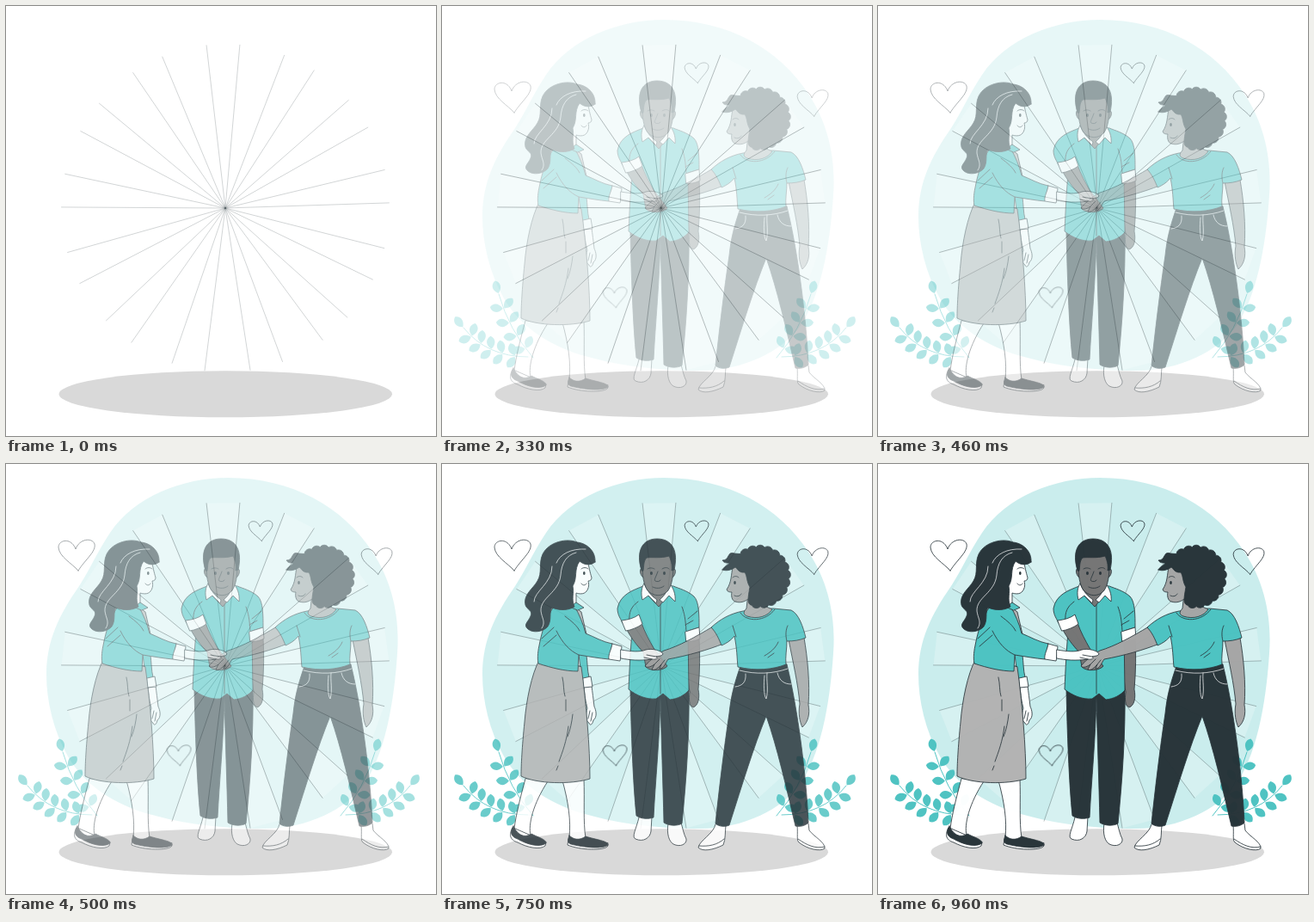
Write an HTML page that moves like this. It is 500x500 px and loops after 1000 ms.

```html
<!DOCTYPE html>
<html lang="en">
<head>
<meta charset="utf-8">
<title>Together</title>
<style>
html, body { margin: 0; width: 100%; height: 100%; overflow: hidden; background: #fff; }
svg { display: block; width: 100vw; height: 100vh; }
.fade { opacity: 0; }
path { stroke-linejoin: round; stroke-linecap: round; }
.fig path { stroke: #263238; stroke-width: .85; fill: none; }
.fig .dark { fill: #263238; }
.fig .teal { fill: #4bc2c1; }
.fig .white { fill: #fff; }
.fig .skirt { fill: #b2b2b2; }
.fig .deep { fill: #747474; }
.fig .tan { fill: #a5a5a5; }
.fig .chalk { stroke: #fff; stroke-width: .7; }
ellipse { fill: #263238; }
#floor { fill: #d9d9d9; }
.leaf { fill: #4bc2c1; }
.stem { fill: none; stroke: #4bc2c1; }
</style>
</head>
<body>
<svg viewBox="0 0 500 500" xmlns="http://www.w3.org/2000/svg">
  <path class="fade" data-max=".3" fill="#4bc2c1" d="M258 16C333 16 392 50 426 102C450 138 458 180 455 220C452 265 444 330 418 370C396 402 350 424 300 424C250 424 205 418 170 408C130 398 92 375 72 340C55 310 47 275 47 245C47 205 62 175 85 142C98 122 105 104 121 80C149 38 205 16 258 16Z"/>
  <g id="rays"></g>
  <ellipse id="floor" cx="255.300" cy="451.300" rx="193.700" ry="27"/>
  <g id="hearts" class="fade fig"></g>
  <g id="plants" class="fade"></g>

  <g class="fade fig" id="man">
    <path class="deep" d="M284 204C286 225 285 250 288 265C287 274 287 281 292 283C298 281 300 272 298 262C300 240 300 220 299 202Z"/>
    <path class="white" d="M229 411C226 424 220 434 225 436C234 440 242 435 243 427L244 410Z"/>
    <path class="white" d="M263 418C261 430 264 439 269 442C277 446 285 442 284 436C281 430 280 424 278 417Z"/>
    <path class="dark" d="M219 262C220 310 222 370 226 409C232 413 240 413 246 411C248 370 253 320 254 270C255 320 257 370 258 417C264 421 274 421 279 418C284 370 288 310 287 262Z"/>
    <path class="teal" d="M234 142C221 147 207 152 204 168C204 176 208 180 210 185L222 186C219 213 218 240 217 262C226 269 237 274 249 273L257 267L265 274C274 273 282 269 287 263L286 194L299 190C299 176 299 160 293 154C285 147 276 145 269 142Z"/>
    <path d="M254 163V267M218 183C217 172 220 166 228 160M284 194C283 180 282 174 279 166M286 180L297 171M283 187L292 182"/>
    <path class="deep" d="M238 142L236 149L252 166L266 149L264 142Z"/>
    <path class="white" d="M235 139C232 143 231 150 233 158L240 153L249 162L250 158C243 153 238 147 235 139ZM264 138C269 144 272 151 271 160L264 153L257 161L253 158C260 152 263 146 264 138Z"/>
    <path class="deep" d="M234 122C229 119 229 129 235 133ZM267 122C273 119 273 129 267 133Z"/>
    <path class="deep" d="M234 106C232 123 233 138 239 147C247 155 257 154 263 147C269 138 270 122 268 105Z"/>
    <path class="dark" d="M232 124C225 101 233 87 250 87C268 87 275 101 270 123L267 124C268 117 266 111 264 107C254 110 244 108 238 109C234 113 235 119 234 124Z"/>
    <path d="M251 125C249 131 246 135 248 136C250 137 253 137 254 135M245 143C249 145 254 145 258 142M239 122C242 120 245 121 247 122M256 122C259 120 262 120 264 122"/>
    <ellipse cx="243.500" cy="127" rx="1.500" ry="2"/>
    <ellipse cx="258.500" cy="127" rx="1.500" ry="2"/>
    <path class="deep" d="M214 191C220 203 227 211 234 219L237 236C243 242 258 240 262 235L246 214C241 205 236 196 232 185Z"/>
    <path class="white" d="M209 182C217 181 224 179 229 175L233 186C228 190 220 193 214 194Z"/>
    <path class="white" d="M283 195L299 190L300 203C295 206 288 207 284 206Z"/>
  </g>

  <g class="fade fig" id="right">
    <path class="tan" d="M403 204C408 230 414 255 416 279C414 290 416 300 419 306C426 300 428 290 426 280C428 255 425 225 421 202Z"/>
    <path class="white" d="M318 419C316 430 299 438 298 446C303 451 315 449 327 443C330 436 329 428 330 420Z"/>
    <path class="white" d="M413 419C414 432 412 437 415 440C425 448 440 451 445 447C446 440 432 433 427 426L426 418Z"/>
    <path d="M299 444C310 445 320 443 328 436M414 436C424 443 434 448 445 445"/>
    <path class="dark" d="M347 235C340 255 336 270 334 290C328 330 322 380 318 418C322 422 330 422 334 420C350 370 362 330 377 293C390 330 400 375 411 421C416 422 422 421 426 417C424 370 415 290 401 233Z"/>
    <path class="chalk" d="M346 240C365 245 385 244 402 238M378 243C377 252 380 262 377 273C374 269 374 256 375 246M353 244C354 254 349 258 341 259M390 243C392 252 398 256 406 256"/>
    <path class="tan" d="M315 189C295 201 275 212 258 217C248 222 240 230 236 235C239 238 244 235 247 233L244 239C248 241 252 236 255 233L253 238C258 238 260 231 263 227C285 223 310 216 327 209Z"/>
    <path d="M247 233L253 227M255 233L259 228"/>
    <path class="teal" d="M350 171C335 174 324 180 313 190C318 195 322 203 325 211C332 208 337 204 340 200C343 214 343 226 344 236C365 241 385 239 400 233C399 225 401 215 401 206C409 206 416 205 423 202C420 190 415 174 406 170L385 168Z"/>
    <path d="M338 188L342 201M401 206C399 198 400 192 402 188M375 223C382 219 388 214 391 207M379 225L386 220"/>
    <path class="tan" d="M356 150L354 168C350 172 350 175 355 177C367 181 379 177 384 169L375 165Z"/>
    <path d="M347 173C354 184 376 184 387 169"/>
    <path class="tan" d="M338 120C336 129 337 137 331 146C332 149 335 149 337 149C336 153 337 159 341 160C347 162 353 160 357 156L368 140L358 118Z"/>
    <path d="M340 153C344 155 347 153 348 151M338 132C340 130 343 130 345 132"/>
    <ellipse cx="340.500" cy="138" rx="1.300" ry="2"/>
    <path id="curls" class="dark"/>
  </g>

  <g class="fade fig" id="left">
    <path class="white" d="M97 366C91 388 86 408 84 424C88 435 97 437 103 432C100 419 106 395 123 369Z"/>
    <path class="white" d="M140 368C147 393 150 415 148 434C153 440 162 440 167 435C164 415 166 392 165 366Z"/>
    <path class="white" d="M82 423C78 430 78 437 88 440C99 446 114 449 120 444L121 440Z"/>
    <path class="dark" d="M83 421C79 427 79 433 88 436C100 443 114 446 121 441C121 436 111 434 104 430C95 436 87 430 83 421Z"/>
    <path class="white" d="M147 436L146 443C160 449 189 450 193 444L193 441Z"/>
    <path class="dark" d="M148 432C146 437 146 441 150 442C165 446 188 448 193 443C193 438 179 437 167 433C160 438 153 437 148 432Z"/>
    <path class="white" d="M165 258C166 270 167 276 169 284C167 290 167 300 171 301C172 305 175 303 176 298C181 294 179 286 177 282C176 273 175 266 174 258Z"/>
    <path d="M172 287L170 296M175 289L173 299"/>
    <path class="teal" d="M158 212L168 222C169 230 169 240 171 248L163 250Z"/>
    <path class="white" d="M164 249L173 247L175 259L165 260Z"/>
    <path class="skirt" d="M113 228C104 245 98 275 96 300C93 330 92 350 92 363C110 372 150 373 172 366C172 330 168 280 162 236Z"/>
    <path d="M140 248C142 256 141 264 143 270M144 274L144 287M152 291C151 300 149 310 146 317M147 305C145 322 140 335 136 346M135 351L133 356"/>
    <path class="skirt" d="M153 165L162 172L168 198L160 204Z"/>
    <path class="teal" d="M130 166C121 178 116 195 113 211C111 220 111 228 112 232C127 237 143 241 158 241L159 222C172 224 183 226 194 227L198 209C187 207 177 201 167 197C164 185 160 176 154 165Z"/>
    <path d="M133 194C140 208 148 217 159 222M130 190L116 203M133 199L118 212M143 177C151 183 157 188 160 194"/>
    <path class="white" d="M198 209L209 212C208 218 209 223 207 229L194 227C193 221 197 216 198 209Z"/>
    <path class="white" d="M208 216C220 218 230 219 237 216C244 214 256 217 257 221C255 224 251 223 249 224C252 225 249 228 244 227C230 229 218 228 208 226Z"/>
    <path d="M249 224L238 222M244 227L235 225"/>
    <path class="white" d="M152 112L169 111C171 120 172 126 174 132C174 135 172 136 170 136C171 140 171 144 168 148C165 152 159 151 156 150L156 164L148 168Z"/>
    <path d="M162 139C164 142 167 141 168 139M162 122C164 120 168 120 170 122"/>
    <ellipse cx="165.300" cy="127" rx="1.300" ry="2"/>
    <path class="teal" d="M149 166L156 161L165 167L158 170Z"/>
    <path class="dark" d="M178 114C179 101 168 92 157 91C146 86 124 90 117 105C112 116 117 126 111 136C106 145 94 152 97 164C99 170 106 170 103 177C100 184 94 187 100 192C106 197 118 195 123 189C128 181 124 173 128 167C138 171 147 170 154 166C150 156 154 150 152 142C158 132 153 123 160 113C166 118 173 118 178 114Z"/>
    <path class="chalk" d="M167 99C150 98 137 105 133 115M156 103C144 106 139 116 138 129C136 150 114 155 115 171C116 179 121 184 116 191M128 119C128 139 107 148 107 160"/>
  </g>
</svg>
<script>
const $ = id => document.getElementById(id);
const RAD = Math.PI / 180;
const each = (n, f) => Array.from({ length: n }, (_, i) => f(i));
const polar = (cx, cy, rx, ry, deg) =>
  `${(cx + rx * Math.cos(deg * RAD)).toFixed(1)} ${(cy + ry * Math.sin(deg * RAD)).toFixed(1)}`;

// Evenly spread wedges with only their sides stroked
const WEDGES = 13, SPREAD = 11.7, FIRST = -96.6;
$('rays').innerHTML = each(WEDGES, i => {
  const a = FIRST + i * 360 / WEDGES;
  const d = `M${polar(255, 235, 190.500, 190.500, a)}L255 235L${polar(255, 235, 190.500, 190.500, a + SPREAD)}`;
  return `<path d="${d}" fill="#fff" fill-opacity=".22" stroke="#263238" stroke-width=".8"/>`;
}).join('');

const heart = (x, y, s) =>
  `<path transform="translate(${x} ${y}) scale(${s})" vector-effect="non-scaling-stroke"
    d="M2 19C-6 10 -20 3 -21 -8C-21 -17 -6 -20 -1 -6C3 -18 18 -20 21 -12C23 -3 10 6 2 19Z"/>`;
$('hearts').innerHTML = heart(82, 105, 1) + heart(296, 77, .66) + heart(431, 112, .85) + heart(201, 338, .66);

// Curly hair: a tuft, then scallops around an ellipse
const CURLS = 14;
$('curls').setAttribute('d', `M326 123C329 118 333 118 334 115C330 115 328 115 326 112C335 112 331 101 340 104` +
  each(CURLS + 1, i => (i ? 'A6 6 0 0 1 ' : 'L') + polar(369, 131, 34, 34.500, -130 + i * 235 / CURLS)).join('') +
  'C354 163 356 155 358 143C354 137 355 130 352 126C345 127 343 121 341 120C337 123 331 125 326 123Z');

// A sprig: leaf pairs along a quadratic stem and one leaf at its tip
function sprig(x0, y0, cx, cy, x1, y1, pairs) {
  const leaf = (x, y, deg) =>
    `<path class="leaf" transform="translate(${x} ${y}) rotate(${deg})" d="M1 0C6 -7 13 -6 16 0C13 6 6 6 1 0Z"/>`;
  const along = (a, b, c, t) => (1 - t) ** 2 * a + 2 * t * (1 - t) * b + t * t * c;
  const slope = (a, b, c, t) => (1 - t) * (b - a) + t * (c - b);
  const parts = each(pairs + 1, i => {
    const t = .16 + .84 * i / pairs;
    const x = along(x0, cx, x1, t), y = along(y0, cy, y1, t);
    const deg = Math.atan2(slope(y0, cy, y1, t), slope(x0, cx, x1, t)) / RAD;
    return i === pairs ? leaf(x, y, deg) : leaf(x, y, deg + 62) + leaf(x, y, deg - 62);
  });
  return `<path class="stem" d="M${x0} ${y0}Q${cx} ${cy} ${x1} ${y1}"/>` + parts.join('');
}
const plant = sprig(100, 408, 52, 408, 25, 374, 5) + sprig(106, 409, 78, 377, 66, 335, 4);
$('plants').innerHTML = `<g>${plant}</g><g transform="translate(495 0) scale(-1 1)">${plant}</g>`;

// One second at 24 steps, each start rounded to 10 ms
const STEPS = 24, LOOP = 1000, HOLD = 3;
const starts = each(STEPS, k => Math.round(k * 100 / STEPS) * 10);
const ease = u => u - Math.sin(2 * Math.PI * u) / (4 * Math.PI);
const faders = document.querySelectorAll('.fade');

function draw() {
  const t = performance.now() % LOOP;
  const k = starts.filter(s => s <= t).length - 1;
  const shown = k < HOLD ? 0 : ease(k / STEPS);
  for (const el of faders) el.style.opacity = shown * (el.dataset.max || 1);
  $('rays').style.strokeOpacity = k < HOLD ? .26 : .4;
  requestAnimationFrame(draw);
}
draw();
</script>
</body>
</html>
```
